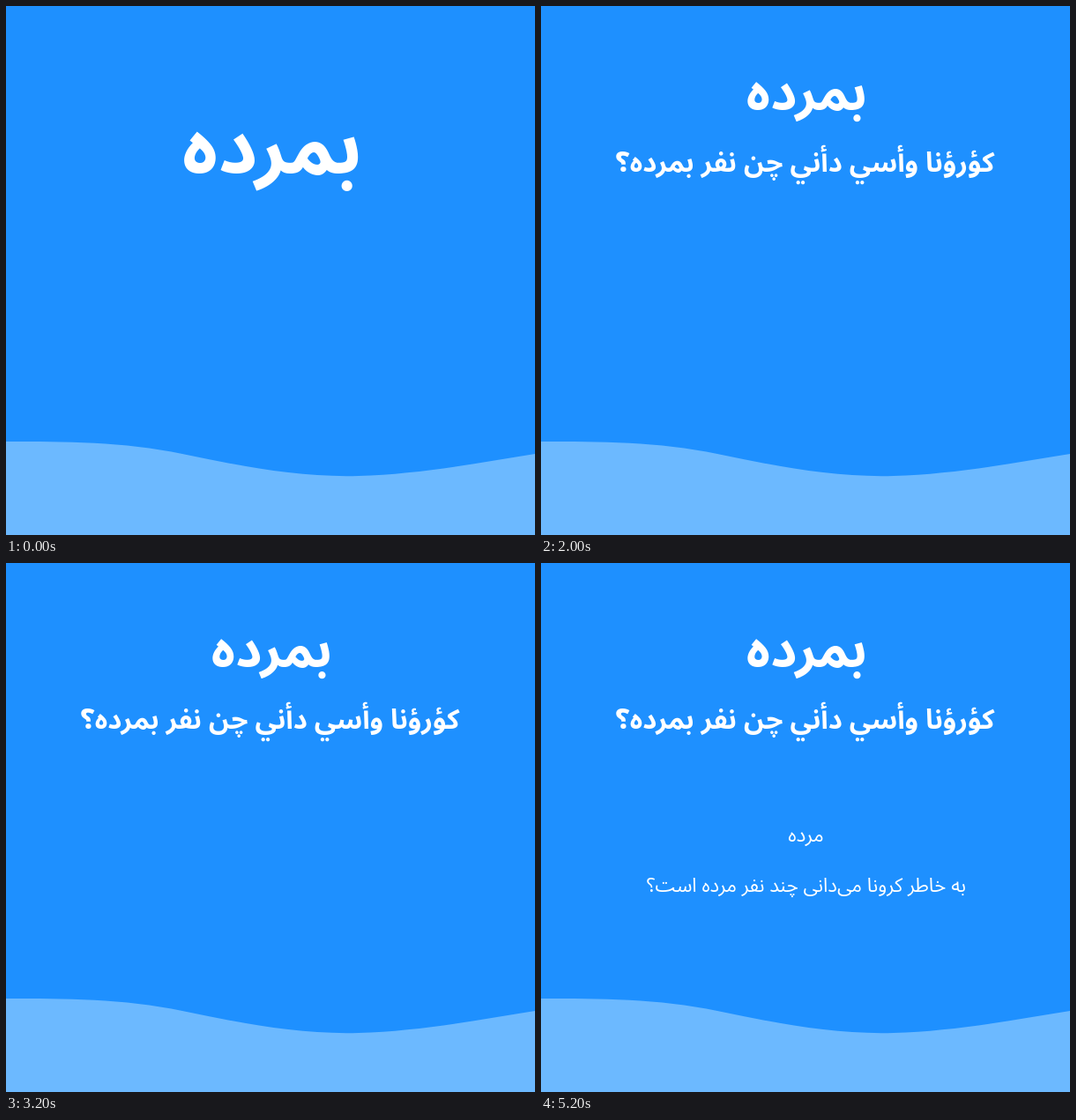
These frames come from a looping animation (600 px wide and 600 px high, 6 s). An HTML page:

```html
<!DOCTYPE html>
<html lang="fa">
<head>
<meta charset="utf-8">
<title>بمرده</title>
<style>
  html, body { margin: 0; width: 100%; height: 100%; overflow: hidden; background: #1e90ff; }
  svg { display: block; width: 100vw; height: 100vh; }
  text { fill: #fff; text-anchor: middle; direction: rtl; }
</style>
</head>
<body>
<svg id="stage" viewBox="0 0 600 600">
  <rect width="600" height="600" fill="#1e90ff"/>
  <path fill="#6cb9ff" d="M0 494C67 494 133 494 200 508C267 522 333 535 400 533C467 531 533 519 600 508V600H0Z"/>
</svg>
<script>
const LOOP = 6000;
const FONT = '"Vazirmatn", "Vazir", "Noto Sans Arabic", "Noto Sans Arabic UI", "DejaVu Sans Condensed", "DejaVu Sans", sans-serif';
const SPACE = 0.26; // word gap in em
const stage = document.getElementById("stage");
const pen = document.createElement("canvas").getContext("2d");

// Each line: text, weight, ink span on the stage, baseline, time shown
const lines = [
  { text: "بمرده", weight: 700, left: 201.5, right: 399.5, y: 190, from: 0, to: 2000 },
  { text: "بمرده", weight: 700, left: 234, right: 367, y: 118, from: 2000, to: LOOP },
  { text: "کؤرؤنا وأسي دأني چن نفر بمرده؟", weight: 700, left: 85, right: 515, y: 188, from: 2000, to: LOOP },
  { text: "مرده", weight: 400, left: 281, right: 319.5, y: 316, from: 4000, to: LOOP },
  { text: "به خاطر کرونا می\u200cدانی چند نفر مرده است؟", weight: 400, left: 120, right: 481, y: 373, from: 4000, to: LOOP }
];

// Picks the natural font size for a line and centres its ink
function addLine(line) {
  pen.font = `${line.weight} 100px ${FONT}`;
  pen.direction = "rtl";
  pen.textAlign = "center";
  pen.wordSpacing = "0px";
  const gap = SPACE - pen.measureText(" ").width / 100;
  pen.wordSpacing = `${gap * 100}px`;
  const m = pen.measureText(line.text);
  const inkL = m.actualBoundingBoxLeft, inkR = m.actualBoundingBoxRight;
  const scale = (line.right - line.left) / (inkL + inkR);

  const node = document.createElementNS("http://www.w3.org/2000/svg", "text");
  node.textContent = line.text;
  node.setAttribute("x", (line.left + line.right) / 2 + (inkL - inkR) / 2 * scale);
  node.setAttribute("y", line.y);
  node.style.font = `${line.weight} ${100 * scale}px ${FONT}`;
  node.style.wordSpacing = `${gap}em`;
  stage.append(node);
  line.node = node;
}

function draw(t) {
  for (const { node, from, to } of lines) {
    node.setAttribute("visibility", t >= from && t < to ? "visible" : "hidden");
  }
}

lines.forEach(addLine);
const start = performance.now();
function tick() {
  draw((performance.now() - start) % LOOP);
  requestAnimationFrame(tick);
}
tick();
</script>
</body>
</html>
```
